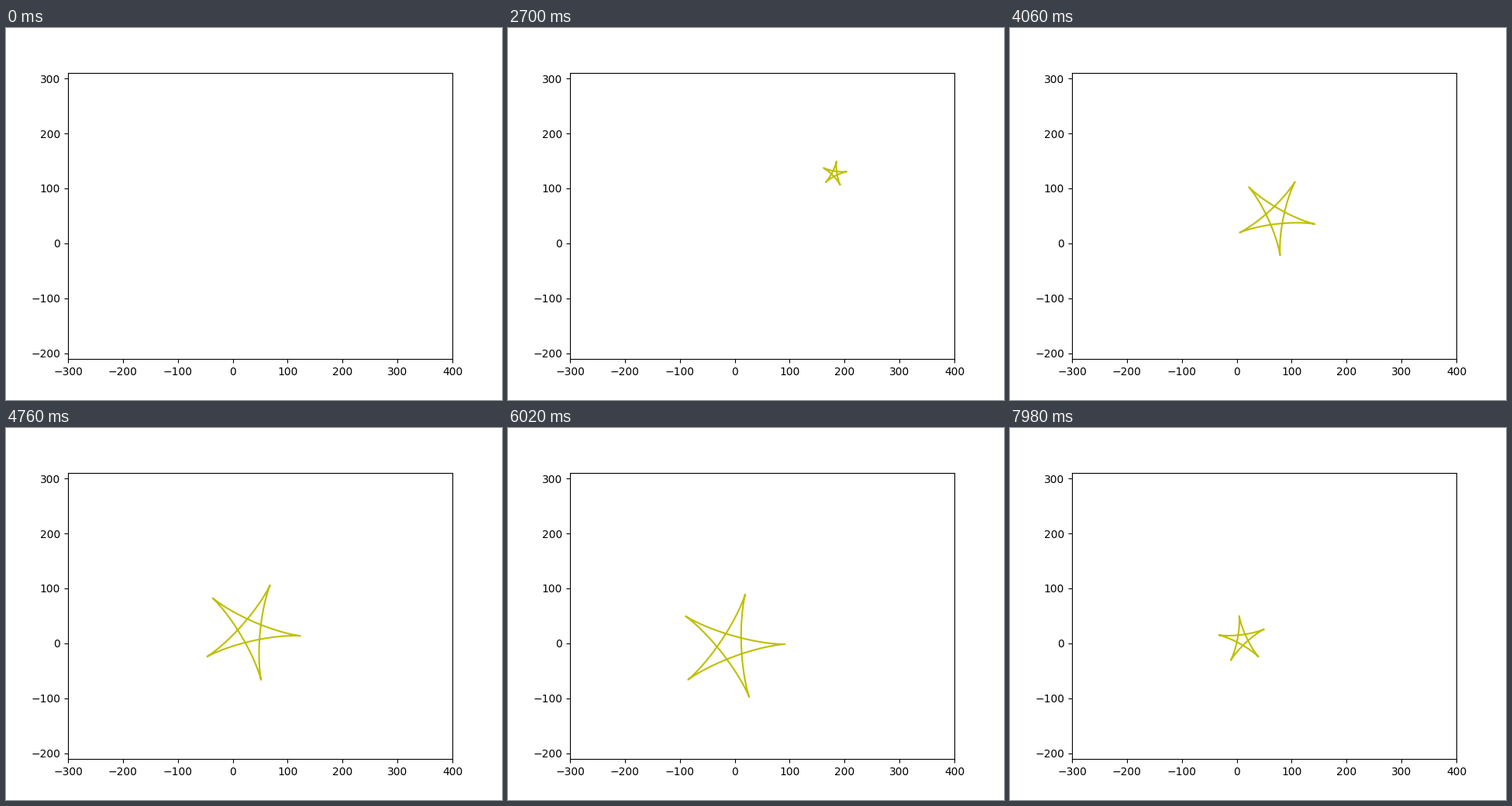
Write a matplotlib script that moves like this. It is 640x480 px and loops after 8 s.

```python
import numpy as np
import matplotlib.pyplot as plt
from matplotlib.animation import FuncAnimation

FRAMES = 400
INTERVAL = 20
TIME_STEP = 0.01
ZERO_FRAME = 282  # frame at which the star passes the origin

fig, ax = plt.subplots(figsize=(6.4, 4.8), dpi=100)
ax.set_xlim(-300, 400)

# Equal scale on both axes, with y centred on 50.
half_height = 350 * (480 * 0.77) / (640 * 0.775)
ax.set_ylim(50 - half_height, 50 + half_height)

# Five-cusped hypocycloid of unit radius.
u = np.linspace(0, 2 * np.pi, 1001)
STAR = 0.6 * np.exp(2j * u) + 0.4 * np.exp(-3j * u)

line, = ax.plot([], [], color="y", linewidth=1.5)


def star_at(t):
    """Star moved along a parabola in time, scaled and turned on an ellipse."""
    center = (50 + 35j) * t * (t - 1)
    spin = 100 * np.cos(t) + 20j * np.sin(t)
    return center + spin * STAR


def init():
    line.set_data([], [])
    return line,


def update(frame):
    points = star_at((frame - ZERO_FRAME) * TIME_STEP)
    line.set_data(points.real, points.imag)
    return line,


animation = FuncAnimation(fig, update, frames=FRAMES, init_func=init,
                          interval=INTERVAL, repeat=True, repeat_delay=0,
                          blit=False)
plt.show()
```
